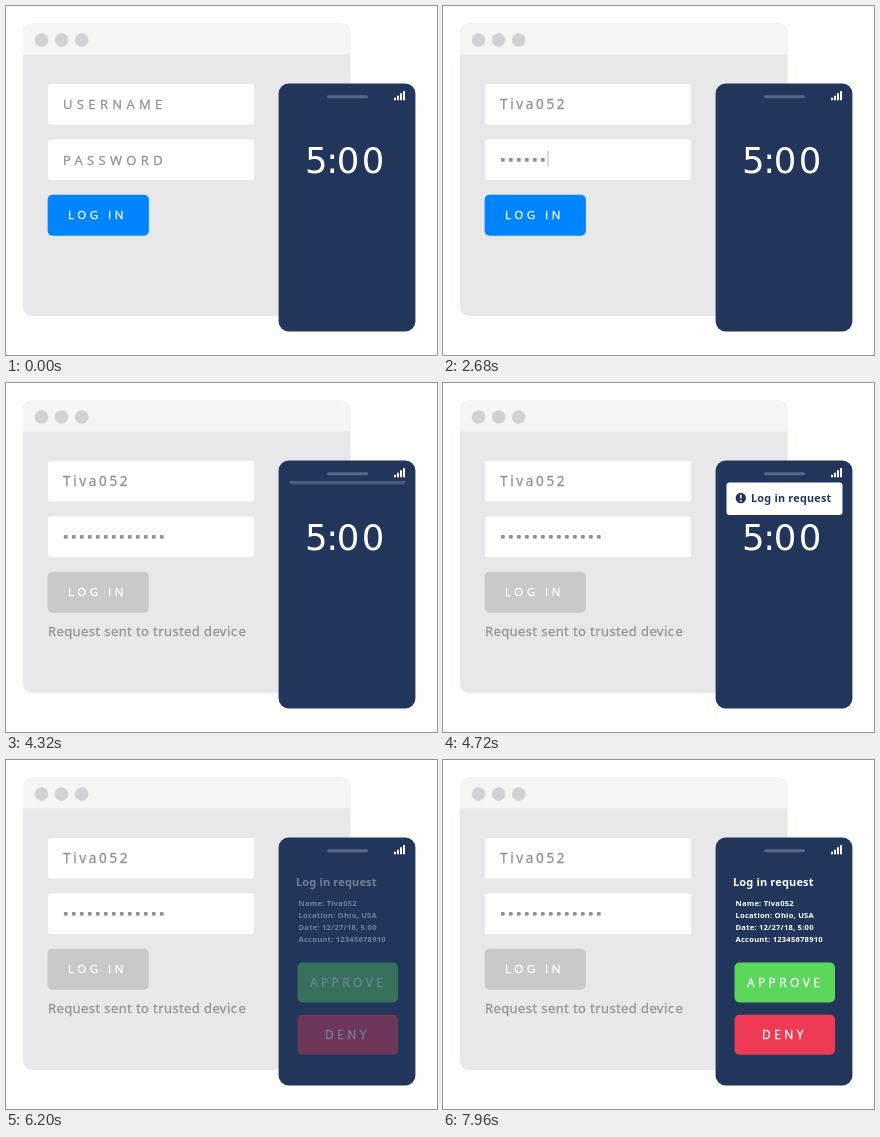
Recreate the animation shown at these times as an HTML page. Size 431x349 px, loop 8000 ms.

```html
<!DOCTYPE html>
<html lang="en">
<head>
<meta charset="utf-8">
<title>Trusted device login</title>
<style>
html, body { margin: 0; width: 100%; height: 100%; overflow: hidden; background: #fefefd; }
svg { display: block; width: 431px; height: 349px; color: #fff; }
text { font-family: "Noto Sans", sans-serif; white-space: pre; fill: currentColor; }
.caps { font-family: "Open Sans", sans-serif; }
.caps, .note { stroke: currentColor; stroke-width: .3px; }
.field { font-size: 13px; letter-spacing: 4.35px; color: #929296; }
#user.typed { font: 13.5px "Noto Sans", sans-serif; letter-spacing: 2.65px; }
.note { font-size: 13px; letter-spacing: .4px; color: #949498; }
.button { font-size: 12px; letter-spacing: 3.4px; }
.clock { font: 35.5px "DejaVu Sans", sans-serif; letter-spacing: 2.4px; }
.heading { font-size: 11px; font-weight: 600; letter-spacing: .15px; }
.detail { font-size: 7.6px; font-weight: 600; letter-spacing: .22px; }
</style>
</head>
<body>
<svg viewBox="0 0 431 349">
  <defs>
    <clipPath id="screen"><rect x="273" y="98" width="136" height="227"/></clipPath>
  </defs>

  <rect x="17" y="17.5" width="327.5" height="292.5" rx="9" fill="#e8e8eb"/>
  <path d="M17 48.5V26.5a9 9 0 0 1 9-9H335.5a9 9 0 0 1 9 9V48.5Z" fill="#f5f5f4"/>
  <g fill="#d2d2d4">
    <circle cx="35.5" cy="34" r="6.8"/>
    <circle cx="55.6" cy="34" r="6.8"/>
    <circle cx="75.7" cy="34" r="6.8"/>
  </g>

  <g fill="#fefefd">
    <rect x="42" y="78" width="206" height="40.5" rx="2"/>
    <rect x="42" y="133.5" width="206" height="40.5" rx="2"/>
  </g>
  <text id="user" class="caps field" x="57" y="103.2"></text>
  <text id="passHint" class="caps field" x="57" y="158.7">PASSWORD</text>
  <g id="dots" fill="#929296"></g>
  <rect id="cursor" width="1" height="15.5" fill="#b4b4b8"/>

  <rect id="login" x="41.6" y="188.7" width="101.3" height="41" rx="5"/>
  <rect id="loginOff" x="41.6" y="188.7" width="101.3" height="41" rx="5" fill="#c9c9cb"/>
  <text class="caps" x="62" y="213.4" font-size="11.5" letter-spacing="3.5">LOG IN</text>
  <text id="sent" class="note" x="42" y="253">Request sent to trusted devic<tspan dx="1.3">e</tspan></text>

  <rect x="272.6" y="77.6" width="136.8" height="247.8" rx="10" fill="#22365b"/>
  <path d="M322.5 90.8H360.5" stroke="#5a6888" stroke-width="3" stroke-linecap="round"/>
  <path d="M388 94.3v-2.6h2v2.6zM391 94.3v-4.6h2v4.6zM394 94.3v-7h2v7zM397 94.3v-9.3h2v9.3z" fill="#fff"/>
  <text id="clock" class="clock" x="299.1" y="167.2"><tspan letter-spacing="-1.5" style="letter-spacing: -1.5px">5:</tspan>00</text>

  <g clip-path="url(#screen)">
    <g id="banner" color="#22365b">
      <rect x="283.5" y="99.5" width="116" height="32.5" rx="3" fill="#fff"/>
      <circle cx="297.8" cy="115" r="5.2" fill="currentColor"/>
      <path d="M297.8 111.8v3.6M297.8 116.9v1.5" stroke="#fff" stroke-width="1.6"/>
      <text x="308" y="119" font-size="10.8" font-weight="700" letter-spacing=".25">Log in request</text>
    </g>
  </g>

  <g id="request">
    <text class="heading" x="290" y="125.5">Log in request</text>
    <g id="details"></g>
    <rect id="approve" x="291.5" y="202.5" width="100.5" height="40" rx="5"/>
    <text class="caps button" x="304" y="227">APPROVE</text>
    <rect x="291.5" y="254.8" width="100.5" height="40" rx="5" fill="#ee3a55"/>
    <text class="caps button" x="319" y="279.4">DENY</text>
  </g>
</svg>

<script>
const el = id => document.getElementById(id);
const LOOP = 8000, TICK = 40, USER = "Tiva052";
const userKeys = [920, 1000, 1120, 1200, 1320, 1480, 1560];
const passKeys = [2360, 2440, 2480, 2560, 2640, 2680, 2720, 2800, 2920, 3000, 3120, 3200, 3280];

const ramp = (t, start, length) => Math.min(1, Math.max(0, (t - start) / length));
const easeOut = p => 1 - (1 - p) ** 1.1;
const typed = (keys, t) => keys.filter(k => t >= k).length;
const within = (t, from, to) => t >= from && t < to;
const show = (id, opacity) => el(id).setAttribute("opacity", opacity);
const set = (id, attrs) => {
  for (const name in attrs) el(id).setAttribute(name, attrs[name]);
};

el("dots").innerHTML = passKeys.map((_, i) =>
  `<rect x="${57.9 + 8 * i}" y="152" width="3.8" height="3.8" rx="1"/>`).join("");

el("details").innerHTML =
  ["Name: " + USER, "Location: Ohio, USA", "Date: 12/27/18, 5:00", "Account: 12345678910"]
    .map((line, i) => `<text class="detail" x="292.5" y="${145.8 + 12 * i}">${line}</text>`).join("");

function drawForm(t) {
  const started = t >= 800, user = el("user");
  user.textContent = started ? USER.slice(0, typed(userKeys, t)) : "USERNAME";
  user.classList.toggle("typed", started);

  const count = typed(passKeys, t);
  [...el("dots").children].forEach((dot, i) => dot.setAttribute("opacity", i < count ? 1 : 0));
  show("passHint", t < 2280 ? 1 : 0);

  const inUser = within(t, 800, 1640), inPass = within(t, 2280, 3400);
  show("cursor", inUser || inPass ? 1 : 0);
  if (inUser) set("cursor", { x: 56 + user.getComputedTextLength(), y: 90.5 });
  if (inPass) set("cursor", { x: 56.5 + 8 * count, y: 145 });

  const sent = ramp(t, 4000, 80);
  set("login", { fill: t >= 3840 ? "#006bd0" : "#0085ff" });
  show("login", sent < 1 ? 1 : 0);
  show("loginOff", sent);
  show("sent", sent);
}

function drawPhone(t) {
  const enter = ramp(t, 4280, 440), leave = ramp(t, 5600, 440);
  const visible = enter - leave;
  const lift = 34 * (1 - easeOut(enter) + easeOut(leave));
  set("banner", { transform: `translate(0 ${-lift})` });
  show("banner", visible > 0 ? .1 + .9 * visible : 0);

  show("clock", 1 - ramp(t, 5840, 240));
  show("request", ramp(t, 6040, 440));
  set("approve", { fill: within(t, 7760, 7960) ? "#46b348" : "#5bd75b" });
}

function frame() {
  const t = Math.floor(performance.now() % LOOP / TICK) * TICK;
  drawForm(t);
  drawPhone(t);
  requestAnimationFrame(frame);
}
frame();
</script>
</body>
</html>
```
